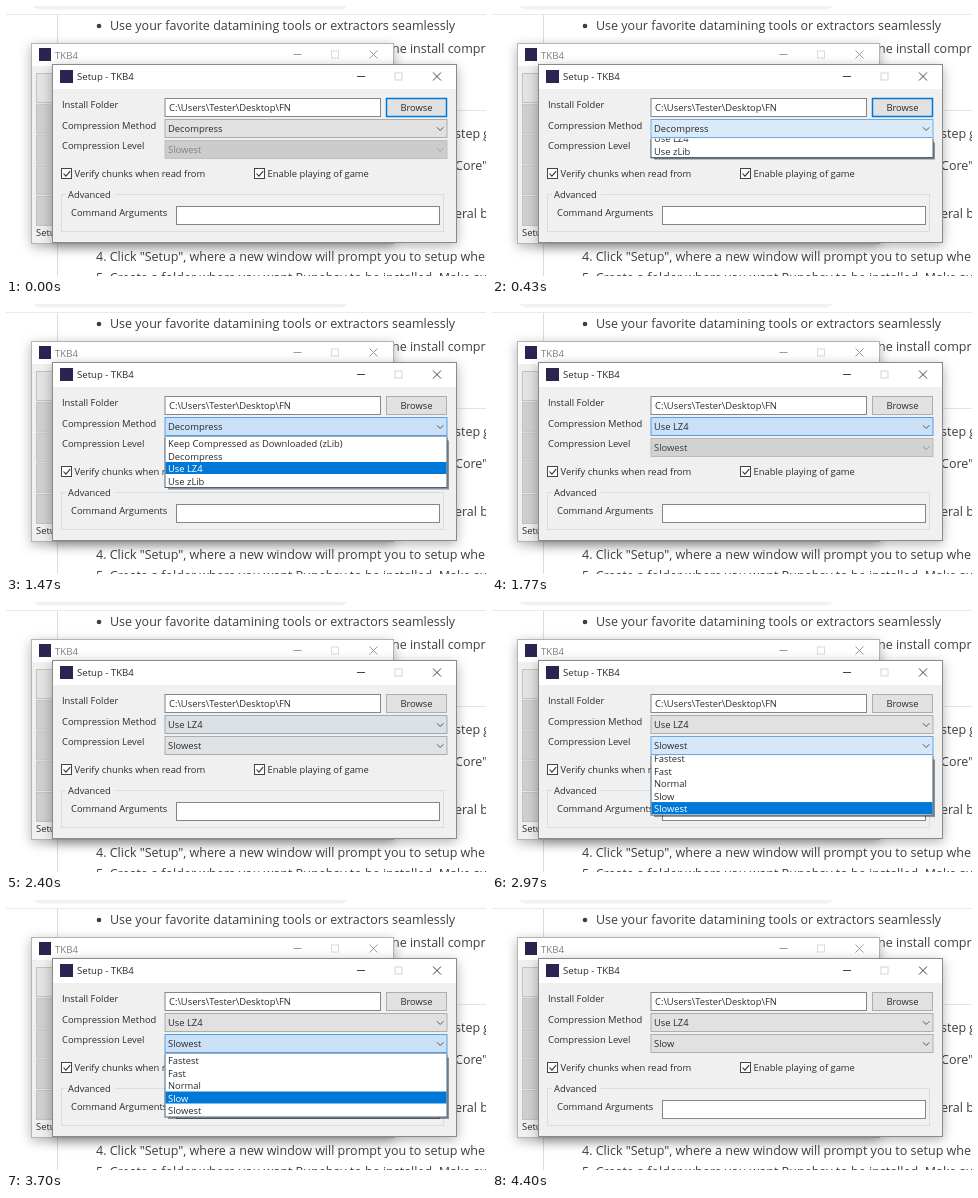
An HTML page for the animation above (4430 ms loop, 480 by 270 pixels).

```html
<!DOCTYPE html>
<html lang="en">
<head>
<meta charset="utf-8">
<title>Setup dialog</title>
<style>
  html, body { margin: 0; width: 100%; height: 100%; overflow: hidden; background: #fff; }
  svg { display: block; width: 100vw; height: 100vh; }
  text { font-family: "Open Sans", "Noto Sans", sans-serif; font-size: 9.4px; fill: #2a2a2a; white-space: pre; }
  .page { font-size: 12.5px; fill: #3a3f45; }
  .title { font-size: 9.6px; }
</style>
</head>
<body>
<svg id="stage" viewBox="0 0 480 270" preserveAspectRatio="none"></svg>
<script>
const LOOP = 4430;
const APP = "TKB4";
const ROW = 12.5;
const INK = "#2a2a2a";

const rect = (x, y, w, h, fill, stroke = "none", extra = "") =>
  `<rect x="${x}" y="${y}" width="${w}" height="${h}" fill="${fill}" stroke="${stroke}" ${extra}/>`;
const label = (x, y, str, extra = "") => `<text x="${x}" y="${y}" ${extra}>${str}</text>`;
const line = (d, stroke, extra = "") => `<path d="${d}" fill="none" stroke="${stroke}" ${extra}/>`;
const pageText = (x, y, str) => label(x, y, str, 'class="page"');

function page() {
  return rect(0, 0, 480, 270, "#fff") +
    rect(25, -16, 318, 19.5, "#edf3f0", "none", 'rx="9"') +
    line("M0 8.5H480", "#e9e9e9") +
    line("M51.5 9V270", "#dcdcdc") +
    '<circle cx="93" cy="20" r="2.3" fill="#3a3f45"/>' +
    pageText(104, 24, "Use your favorite datamining tools or extractors seamlessly") +
    pageText(386, 47, "ne install compression") +
    line("M440 104.5H480", "#e1e4e8") +
    pageText(449, 132, "step guide") +
    pageText(449, 164, "Core&quot;") +
    pageText(449, 212, "eral buttons") +
    pageText(90, 255, "4. Click &quot;Setup&quot;, where a new window will prompt you to setup where") +
    pageText(90, 276, "5. Create a folder where you want Runebay to be installed. Make sure");
}

function captionButtons(xs, y, color, disabled) {
  const [min, max, close] = xs;
  return line(`M${min - 4} ${y}h8`, color) +
    rect(max - 3.5, y - 3.5, 7, 7, "none", disabled) +
    line(`M${close - 4} ${y - 4}l8 8m0 -8l-8 8`, color);
}

function rearWindow() {
  let buttons = "";
  for (let i = 0; i < 5; i++) {
    buttons += rect(30.5, 67.5 + i * 30.75, 40, 29, i ? "#cfcfcf" : "#e3e3e3", "#c2c2c2");
  }
  return rect(25.5, 37.5, 362, 200, "#f0f0f0", "#b4b4b4", 'filter="url(#soft)"') +
    rect(26, 38, 361, 22, "#fff") +
    rect(33, 42, 12, 13, "#2c2350") +
    label(49, 53, APP, 'class="title" fill-opacity=".6"') +
    captionButtons([291.5, 329, 367.5], 48.5, "#9a9a9a", "#dadada") +
    buttons + label(30, 230, "Setup");
}

const checkbox = (x, str) =>
  rect(x + .5, 162.5, 10, 10, "#fff", "#444") +
  line(`M${x + 2.5} 167.5l2.4 2.6 4.3 -5`, "#333", 'stroke-width="1.1"') +
  label(x + 13.5, 171, str);

const combo = (id, y) =>
  rect(159, y + .5, 282, 18, "#e1e1e1", "#adadad", `id="${id}Box"`) +
  label(162, y + 13, "", `id="${id}Text"`) +
  line(`M431 ${y + 8.3}l3.2 3.2 3.2 -3.2`, "#555", `id="${id}Arrow"`);

const METHODS = ["Keep Compressed as Downloaded (zLib)", "Decompress", "Use LZ4", "Use zLib"];
const LEVELS = ["Fastest", "Fast", "Normal", "Slow", "Slowest"];
const listHeight = items => items.length * ROW + 1;

function dropList(id, top, items) {
  const height = listHeight(items);
  const rows = items.map((str, i) => label(162, 10.5 + i * ROW, str, `id="${id}Row${i}"`)).join("");
  return `<clipPath id="${id}Clip"><rect x="157" y="${top}" width="288" height="${height + 1}"/></clipPath>
    <g id="${id}">` + rect(162, top + 4, 281, 0, "#000", "none", `id="${id}Shadow" opacity=".4"`) +
    `<g clip-path="url(#${id}Clip)"><g id="${id}Slide">` +
    rect(159, 0, 282, height, "#fff", "#4a6480") +
    rect(159.5, 0, 281, ROW - .5, "#0078d7", "none", `id="${id}Mark"`) +
    rows + "</g></g></g>";
}

function setupWindow() {
  return rect(46.5, 58.5, 404, 178, "#f0f0f0", "#8a8a8a", 'filter="url(#soft)"') +
    rect(47, 59, 403, 24, "#fff") +
    rect(54, 64, 13, 13, "#2c2350") +
    label(71, 74, `Setup - ${APP}`, 'class="title"') +
    captionButtons([355, 392.5, 431], 70.5, "#444", "#d4d4d4") +
    label(56, 102, "Install Folder") +
    rect(159, 92.5, 215.5, 18, "#fff", "#858585") +
    label(163, 105, "C:\\Users\\Tester\\Desktop\\FN") +
    rect(380.5, 92.5, 60, 18, "#e1e1e1", "#adadad", 'id="browse"') +
    label(410.5, 105, "Browse", 'text-anchor="middle"') +
    label(56, 122.5, "Compression Method") + combo("method", 113) +
    label(56, 143, "Compression Level") + combo("level", 134) +
    checkbox(55, "Verify chunks when read from") +
    checkbox(248, "Enable playing of game") +
    rect(55.5, 188.5, 382, 37, "none", "#dcdcdc") +
    rect(60, 184, 49, 9, "#f0f0f0") +
    label(62, 192, "Advanced") +
    label(65, 210, "Command Arguments") +
    rect(170.5, 200.5, 263, 18, "#fff", "#858585") +
    dropList("methods", 132.5, METHODS) +
    dropList("levels", 153.5, LEVELS);
}

document.getElementById("stage").innerHTML =
  `<defs><filter id="soft" x="-10%" y="-15%" width="120%" height="135%">
    <feDropShadow dx="0" dy="3" stdDeviation="6" flood-opacity=".3"/></filter></defs>` +
  page() + rearWindow() + setupWindow();

const el = id => document.getElementById(id);
const set = (id, attrs) => Object.entries(attrs).forEach(([k, v]) => el(id).setAttribute(k, v));
const ramp = (t, a, b) => Math.min(1, Math.max(0, (t - a) / (b - a)));

const channels = hex => [1, 3, 5].map(i => parseInt(hex.slice(i, i + 2), 16));
function mix(from, to, p) {
  const end = channels(to);
  return `rgb(${channels(from).map((c, i) => Math.round(c + (end[i] - c) * p))})`;
}
// Each fade is [start, end, colour]; the latest one that has begun wins.
function fade(t, base, fades) {
  let from = base, color = base;
  for (const [a, b, to] of fades) {
    if (t < a) break;
    color = mix(from, to, ramp(t, a, b));
    from = to;
  }
  return color;
}

const NORMAL = "#e1e1e1", HOT = "#e5f1fb", PRESSED = "#c9e0f6", DISABLED = "#cccccc";
const EDGE = "#adadad", HOT_EDGE = "#7eb4ea", DOWN_EDGE = "#569de5", FOCUS = "#0078d7";

function showList(id, top, items, t, start, end, close, selected) {
  const open = t >= start && t < close;
  set(id, { display: open ? "inline" : "none" });
  if (!open) return;
  const height = listHeight(items);
  const shown = height * ramp(t, start, end);
  set(id + "Slide", { transform: `translate(0 ${top + shown - height})` });
  set(id + "Shadow", { height: Math.max(0, shown - 2) });
  set(id + "Mark", { y: .5 + selected * ROW });
  items.forEach((_, i) => { el(`${id}Row${i}`).style.fill = i === selected ? "#fff" : INK; });
}

function update(t) {
  const focused = t < 560;
  set("browse", { stroke: focused ? FOCUS : EDGE, "stroke-width": focused ? 1.5 : 1 });

  set("methodBox", {
    fill: fade(t, NORMAL, [[130, 300, HOT], [370, 520, PRESSED], [2200, 2450, NORMAL]]),
    stroke: fade(t, EDGE, [[130, 300, HOT_EDGE], [370, 520, DOWN_EDGE], [2200, 2450, EDGE]])
  });
  el("methodText").textContent = METHODS[t < 1660 ? 1 : 2];

  set("levelBox", {
    fill: fade(t, DISABLED, [[1680, 2000, NORMAL], [2380, 2620, HOT], [2830, 3080, PRESSED], [3990, 4250, NORMAL]]),
    stroke: fade(t, "#bfbfbf", [[1680, 2000, EDGE], [2380, 2620, HOT_EDGE], [2830, 3080, DOWN_EDGE], [3990, 4250, EDGE]])
  });
  el("levelText").textContent = LEVELS[t < 3870 ? 4 : 3];
  el("levelText").style.fill = fade(t, "#838383", [[1660, 1800, INK]]);
  set("levelArrow", { stroke: fade(t, "#a6a6a6", [[1680, 2000, "#555555"]]) });

  showList("methods", 132.5, METHODS, t, 375, 525, 1660, t < 1380 ? 1 : 2);
  showList("levels", 153.5, LEVELS, t, 2820, 2981, 3870, t < 3480 ? 4 : 3);
}

const began = performance.now();
function tick() {
  update((performance.now() - began) % LOOP);
  requestAnimationFrame(tick);
}
update(0);
requestAnimationFrame(tick);
</script>
</body>
</html>
```
